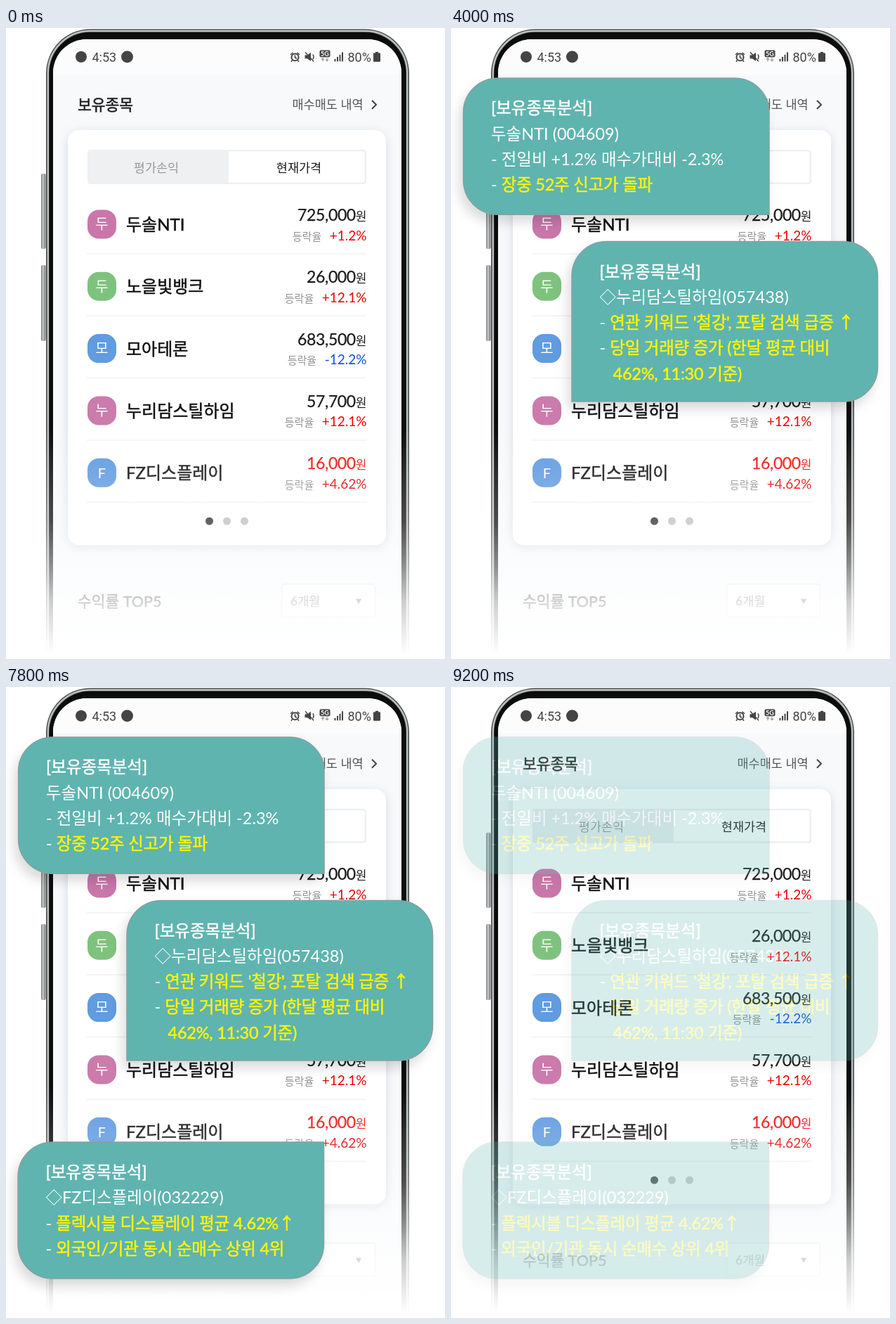
Animation, 625 px wide and 897 px high, one loop 9.3 s. Source, as an HTML page:

```html
<!DOCTYPE html>
<html lang="ko">
<head>
<meta charset="utf-8">
<title>보유종목 알림</title>
<style>
html, body { margin: 0; width: 100%; height: 100%; overflow: hidden; background: #fff; }
svg { display: block; width: 625px; height: 897px; }
text { font-family: Lato, "Noto Sans CJK KR", "Noto Sans CJK", sans-serif; white-space: pre; }
.sys { font-family: Roboto, sans-serif; font-size: 18px; fill: #444; }
.sym { font-family: "Noto Sans CJK KR", "Noto Sans CJK", sans-serif; }
.mid { stroke: currentColor; stroke-width: .5px; }
.end { text-anchor: end; }
.center { text-anchor: middle; }
.head { font-size: 21.5px; color: #1c1c1c; fill: currentColor; }
.label { font-size: 17.5px; fill: #555; }
.name { font-size: 24px; color: #111; fill: currentColor; }
.price { font-size: 23px; letter-spacing: -.35px; color: #1a1a1a; fill: currentColor; stroke: currentColor; stroke-width: .25px; }
.won { font-size: 17px; letter-spacing: 0; stroke: none; }
.rate { font-size: 19px; }
.rate .tag { font-size: 15px; fill: #929292; }
.badge { font-size: 20px; fill: #fff; }
.note { font-size: 23.5px; color: #fff; fill: currentColor; }
.hot { color: #fff600; fill: currentColor; letter-spacing: -.01em; }

#notes { animation: fade 9.3s step-end infinite; }
#notes g { animation: 9.3s step-end infinite; }
#notes g:nth-child(1) { animation-name: first; }
#notes g:nth-child(2) { animation-name: second; }
#notes g:nth-child(3) { animation-name: third; }
@keyframes first { 0% { opacity: 0; } 21.505%, 100% { opacity: 1; } }
@keyframes second { 0% { opacity: 0; } 43.01%, 100% { opacity: 1; } }
@keyframes third { 0% { opacity: 0; } 64.516%, 100% { opacity: 1; } }
@keyframes fade {
  0% { opacity: 1; }
  96.774% { opacity: .75; }
  97.849% { opacity: .5; }
  98.924%, 100% { opacity: .25; }
}
</style>
</head>
<body>
<svg viewBox="0 0 625 897">
  <defs>
    <linearGradient id="mist" gradientUnits="userSpaceOnUse" x1="0" y1="570" x2="0" y2="890">
      <stop offset="0" stop-color="#fff" stop-opacity="0"/>
      <stop offset=".19" stop-color="#fff" stop-opacity=".13"/>
      <stop offset=".41" stop-color="#fff" stop-opacity=".26"/>
      <stop offset=".6" stop-color="#fff" stop-opacity=".52"/>
      <stop offset=".77" stop-color="#fff" stop-opacity=".8"/>
      <stop offset="1" stop-color="#fff"/>
    </linearGradient>
    <linearGradient id="key">
      <stop offset="0" stop-color="#7c7e7e"/>
      <stop offset=".45" stop-color="#cbcdcd"/>
      <stop offset="1" stop-color="#686a6a"/>
    </linearGradient>
    <filter id="soft" x="-10%" y="-10%" width="120%" height="120%">
      <feDropShadow dx="0" dy="3" stdDeviation="7" flood-color="#2a3850" flood-opacity=".13"/>
    </filter>
    <filter id="drop" x="-15%" y="-15%" width="130%" height="140%">
      <feDropShadow dx="-5" dy="10" stdDeviation="8" flood-color="#000" flood-opacity=".14"/>
    </filter>
  </defs>

  <!-- phone body -->
  <rect x="50" y="207" width="6.500" height="107" rx="2" fill="url(#key)"/>
  <rect x="50" y="337" width="6.500" height="108" rx="2" fill="url(#key)"/>
  <rect x="57" y="1.500" width="517" height="960" rx="63" fill="#4c4f4f"/>
  <rect x="59.800" y="4.300" width="511.400" height="960" rx="60" fill="none" stroke="#bcc0c0" stroke-width="2.400"/>
  <rect x="61.500" y="6" width="508" height="960" rx="58.500" fill="#0b0c0c"/>
  <rect x="67" y="16" width="496" height="960" rx="48" fill="#f7f9fb"/>
  <path d="M67 66V64A48 48 0 0 1 115 16H515A48 48 0 0 1 563 64V66Z" fill="#fcfcfc"/>

  <!-- status bar -->
  <circle cx="107" cy="41" r="8" fill="#444"/>
  <text class="sys" x="122.500" y="47.500">4:53</text>
  <circle cx="172.500" cy="41" r="8.500" fill="#444"/>
  <g fill="none" stroke="#444" stroke-width="2">
    <circle cx="411.500" cy="41.500" r="5"/>
    <path d="M411.500 38.500V42L414 43.500M405 38L408.500 35M418 38L414.500 35M407.500 46L406 48M415.500 46L417 48" stroke-width="1.600"/>
    <path d="M426 34.500L438 47.500" stroke-width="1.500"/>
    <path d="M437 37.500Q439 41 437 44.500" stroke-width="1.500"/>
    <path d="M451 47.500V43M449 45L451 43L453 45M457 42.500V47M455 45L457 47L459 45" stroke="#999" stroke-width="1.200"/>
    <path d="M468.500 47.500V44M472 47.500V41M475.500 47.500V38M479 47.500V34.500"/>
  </g>
  <path d="M425.500 38.500H429L434 35V47L429 43.500H425.500Z" fill="#444"/>
  <rect x="446.500" y="31.500" width="15" height="10" rx="2" fill="#444"/>
  <text class="center" x="454" y="39.800" font-size="9" font-weight="700" fill="#fff">5G</text>
  <text class="sys" x="486.500" y="47.500">80%</text>
  <path d="M526 34H530V35.500H532Q533 35.500 533 36.500V47Q533 48 532 48H524Q523 48 523 47V36.500Q523 35.500 524 35.500H526Z" fill="#444"/>

  <!-- page -->
  <text class="head mid" x="102" y="117">보유종목</text>
  <text class="label" x="407.500" y="114.500">매수매도 내역</text>
  <path d="M521 103L527 109L521 115" fill="none" stroke="#444" stroke-width="2"/>
  <rect x="88" y="145" width="453" height="590" rx="16" fill="#fff" filter="url(#soft)"/>
  <rect x="117.200" y="174.200" width="394.600" height="46.600" rx="3" fill="#fff" stroke="#eef0f2" stroke-width="2.500"/>
  <path d="M118 175H317V220H118Z" fill="#eef0f2"/>
  <text class="label center" x="214" y="204.500" style="fill:#999">평가손익</text>
  <text class="label center" x="417" y="204.500" style="fill:#1c1c1c">현재가격</text>
  <g id="rows"></g>
  <circle cx="289.500" cy="701" r="5.500" fill="#2b2b2b"/>
  <circle cx="314.500" cy="701" r="5.500" fill="#bfbfbf"/>
  <circle cx="339.500" cy="701" r="5.500" fill="#bfbfbf"/>
  <text class="head mid" x="102" y="822.500">수익률 TOP5</text>
  <rect x="392.500" y="790.500" width="133" height="47" rx="4" fill="#fff" stroke="#e3e5e7" stroke-width="2"/>
  <text class="label" x="405" y="820.500">6개월</text>
  <path d="M498 811.500H506L502 819Z" fill="#555"/>
  <rect y="570" width="625" height="327" fill="url(#mist)"/>

  <g id="notes"></g>
</svg>
<script>
const UP = '#f00000', DOWN = '#0b50e0';
const rows = [
  ['두', '#c977aa', '두솔NTI', '725,000', '+1.2%'],
  ['두', '#7fc27e', '노을빛뱅크', '26,000', '+12.1%'],
  ['모', '#619be0', '모아테론', '683,500', '-12.2%'],
  ['누', '#cb7bac', '누리담스틸하임', '57,700', '+12.1%'],
  ['F', '#619be0', 'FZ디스플레이', '16,000', '+4.62%', '#ee1414']
];

const drawRow = ([mark, tint, name, price, rate, ink = '#1a1a1a'], i) => {
  const y = 279 + i * 88.3;
  return `
    <rect x="116" y="${y - 20.5}" width="41" height="41" rx="16" fill="${tint}"/>
    <text class="badge center" x="136.500" y="${y + 7.3}">${mark}</text>
    <text class="name mid" x="171" y="${y + 9}">${name}</text>
    <text class="price end" x="513.500" y="${y - 5}" style="color:${ink}">${price}<tspan class="won">원</tspan></text>
    <text class="rate end" x="513.500" y="${y + 22.5}" fill="${rate[0] === '-' ? DOWN : UP}"><tspan class="tag">등락율</tspan><tspan dx="11.500">${rate}</tspan></text>
    <path d="M115 ${y + 42}H513" stroke="#f1f2f3" stroke-width="1.500"/>`;
};

const sym = s => `<tspan class="sym">${s}</tspan>`;
const hot = s => `<tspan class="hot mid">${s}</tspan>`;
const title = '<tspan class="mid">[보유종목분석]</tspan>';

// square: the corner without rounding (tr, br or bl)
const notes = [
  { x: 17.5, y: 71.3, h: 194, square: 'br', lines: [
    title, '두솔NTI (004609)', '- 전일비 +1.2% 매수가대비 -2.3%',
    '- ' + hot('장중 52주 신고가 돌파')] },
  { x: 172, y: 303.5, h: 227.5, square: 'bl', lines: [
    title, sym('◇') + '누리담스틸하임(057438)',
    '- ' + hot(`연관 키워드 '철강', 포탈 검색 급증 ${sym('↑')}`),
    '- ' + hot('당일 거래량 증가 (한달 평균 대비'),
    `<tspan dx="19">${hot('462%, 11:30 기준)')}</tspan>`] },
  { x: 17, y: 647, h: 194, square: 'tr', lines: [
    title, sym('◇') + 'FZ디스플레이(032229)',
    '- ' + hot('플렉시블 디스플레이 평균 4.62%' + sym('↑')),
    '- ' + hot('외국인/기관 동시 순매수 상위 4위')] }
];

const bubble = (x, y, w, h, square) => {
  const r = c => c === square ? 0 : 49;
  const arc = (c, dx, dy) => `a${r(c)} ${r(c)} 0 0 1 ${dx * r(c)} ${dy * r(c)}`;
  return `M${x + 49} ${y}H${x + w - r('tr')}${arc('tr', 1, 1)}V${y + h - r('br')}${arc('br', -1, 1)}` +
    `H${x + r('bl')}${arc('bl', -1, -1)}V${y + 49}${arc('tl', 1, -1)}Z`;
};

const drawNote = ({ x, y, h, square, lines }) => `<g>
  <path d="${bubble(x, y, 435.5, h, square)}" fill="#5eb4b0" stroke="#87a09e" stroke-width="1.500" filter="url(#drop)"/>
  ${lines.map((s, i) => `<text class="note" x="${x + 39.5}" y="${y + 51 + i * 36.3}">${s}</text>`).join('')}
</g>`;

document.getElementById('rows').innerHTML = rows.map(drawRow).join('');
document.getElementById('notes').innerHTML = notes.map(drawNote).join('');
</script>
</body>
</html>
```
